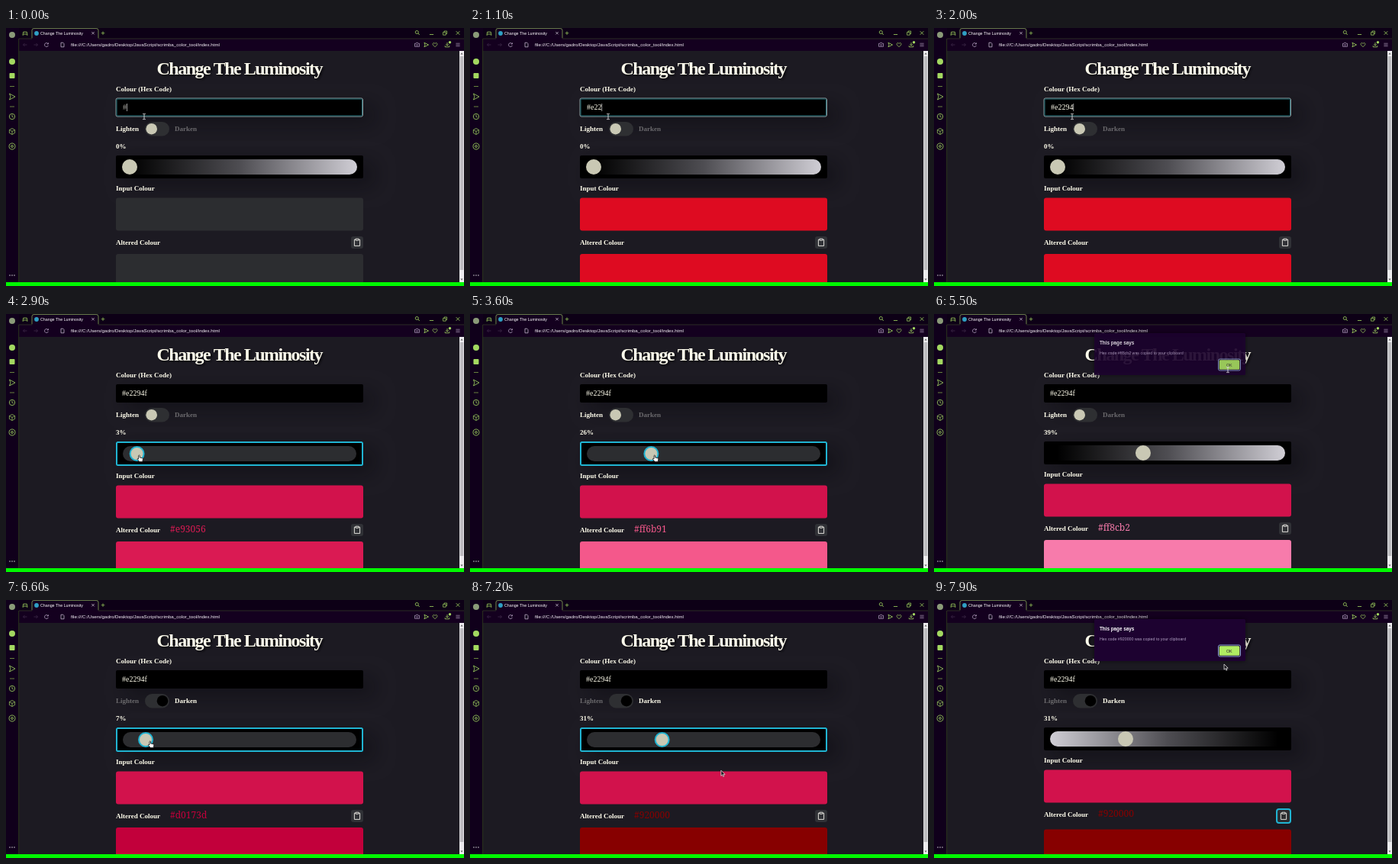
These frames come from a looping animation (600x338 px, 8 s). An HTML page with a canvas:

```html
<!DOCTYPE html>
<html lang="en">
<head>
<meta charset="utf-8">
<title>Change The Luminosity</title>
<style>
html, body { margin: 0; width: 100%; height: 100%; overflow: hidden; background: #1c1a22; }
canvas { display: block; width: 600px; height: 338px; }
</style>
</head>
<body>
<canvas id="stage"></canvas>
<script>
const LOOP = 8000, W = 600, H = 338;
const CREAM = '#fffdec', CYAN = '#20b4d2', LIME = '#a3d860', PALE = '#b9a9c6';
const GREY = '#2c2d30', KNOB = '#c9c8b4';
const SERIF = '"Liberation Serif", "Times New Roman", serif';
const SANS = '"Liberation Sans", Arial, sans-serif';
const canvas = document.getElementById('stage');
const c = canvas.getContext('2d');
const dpr = window.devicePixelRatio || 1;
canvas.width = W * dpr;
canvas.height = H * dpr;

// [time, typed text]
const typing = [[0, '#'], [500, '#e'], [800, '#e2'], [1050, '#e22'], [1400, '#e229'], [1700, '#e2294'], [2100, '#e2294f']];
const lightDrag = [[2800, 0], [3000, 5], [3600, 26], [3950, 39]];
const darkDrag = [[6350, 0], [6600, 7], [7000, 31]];
const toggleAt = 6000;
const alerts = [{ open: 4650, close: 5470, code: '#ff8cb2' }, { open: 7600, close: 9000, code: '#920000' }];
const pointer = [
  [2250, 181, 116], [2700, 166, 185], [2800, 166, 185], [3000, 181, 185], [3600, 241, 185], [3950, 278, 185],
  [4050, 278, 185], [4400, 462, 292], [4700, 462, 292], [5250, 385, 68], [5400, 385, 68], [5500, 385, 73],
  [5600, 370, 80], [5950, 199, 132], [6050, 199, 132], [6300, 168, 185], [6350, 168, 185],
  [6600, 188, 185], [7000, 255, 185], [7080, 255, 185], [7380, 462, 292], [7600, 462, 292], [7900, 380, 84]
];

const clamp = (x, a = 0, b = 1) => Math.min(b, Math.max(a, x));
const smooth = p => p * p * (3 - 2 * p);
const within = (t, a, b) => t >= a && t < b;

function along(keys, t, ease = p => p) {
  if (t <= keys[0][0]) return keys[0].slice(1);
  for (let i = 1; i < keys.length; i++) {
    const a = keys[i - 1], b = keys[i];
    if (t <= b[0]) {
      const p = ease((t - a[0]) / (b[0] - a[0]));
      return a.slice(1).map((v, k) => v + (b[k + 1] - v) * p);
    }
  }
  return keys[keys.length - 1].slice(1);
}

function box(x, y, w, h, r, fill, stroke, lw = 1) {
  c.beginPath();
  c.roundRect(x, y, w, h, r);
  if (fill) { c.fillStyle = fill; c.fill(); }
  if (stroke) { c.strokeStyle = stroke; c.lineWidth = lw; c.stroke(); }
}

function disc(x, y, r, fill, stroke, lw = 1) {
  box(x - r, y - r, 2 * r, 2 * r, r, fill, stroke, lw);
}

function path(d, x, y, stroke, lw = 0.9, fill) {
  c.save();
  c.translate(x, y);
  const p = new Path2D(d);
  if (fill) { c.fillStyle = fill; c.fill(p); }
  if (stroke) { c.strokeStyle = stroke; c.lineWidth = lw; c.stroke(p); }
  c.restore();
}

function text(s, x, y, font, fill) {
  c.font = font;
  c.fillStyle = fill;
  c.fillText(s, x, y);
}

const label = (s, y, x = 144, fill = CREAM) => text(s, x, y, `bold 9px ${SERIF}`, fill);

function shadow(draw) {
  c.save();
  c.shadowColor = 'rgba(8,6,12,.42)';
  c.shadowBlur = 24 * dpr;
  c.shadowOffsetX = 14 * dpr;
  c.shadowOffsetY = 10 * dpr;
  draw();
  c.restore();
}

const shift = (rgb, pct) => rgb.map(v => Math.floor(clamp(v + pct * 2.55, 0, 255)));
const hex = rgb => '#' + rgb.map(v => v.toString(16).padStart(2, '0')).join('');
// slight screen toning of the swatches
const tone = ([r, g, b]) =>
  `rgb(${r * 0.94 - 2 + Math.max(0, g - 41) * 0.09},${Math.max(0, g * 1.06 - 25)},${b * 0.96})`;

function state(t) {
  const typed = typing.filter(k => k[0] <= t).pop()[1];
  const dark = t >= toggleAt;
  const value = Math.round(along(dark ? darkDrag : lightDrag, t)[0]);
  const input = t >= 2100 ? [226, 41, 79] : t >= 1050 ? [238, 34, 34] : null;
  let focus = '';
  if (t < 2750) focus = 'input';
  else if (t < 4350 || within(t, 6330, 7400)) focus = 'slider';
  else if (t < 5450 || t >= 7400) focus = 'copy';
  return { typed, dark, value, input, focus, altered: input && shift(input, dark ? -value : value) };
}

function browser() {
  box(0, 0, W, 30, 0, '#0d0016');
  box(0, 0, 17, H, 0, '#10001b');
  box(17, 14, W, 16, 0, '#14001f');
  box(34, 0.5, 87, 14, [3, 3, 0, 0], '#14001f');
  path('M17 14H34V3Q34 .5 37 .5H118Q121 .5 121 3V14H600', 0, 0, '#3d4a2c', 0.6);
  path('M34 13V3Q34 .5 37 .5H118Q121 .5 121 3V13', 0, 0, '#7f9a58', 0.7);
  path('M16.7 14V333', 0, 0, '#34431f', 0.8);

  disc(8, 9, 4, '#8a9a78');
  disc(8, 44, 4, LIME);
  box(4.5, 59, 7, 7, 1, LIME);
  path('M-3 0H3', 8, 76.5, '#7fa347', 0.8);
  path('M-3.5 -4L4 0L-3.5 4L-2 0Z', 8, 90, LIME, 0.8);
  path('M-3 0H3', 8, 103, '#7fa347', 0.8);
  disc(8, 116, 3.7, null, LIME, 0.8);
  path('M0 -2.3V0L1.7 1', 8, 116, LIME, 0.8);
  path('M0 -4L3.6 -2V2L0 4L-3.6 2V-2ZM-3.6 -2L0 0L3.6 -2M0 0V4', 8, 135.5, LIME, 0.7);
  path('M-1 -4H1L3.5 -2.5L4 0L3.5 2.5L1 4H-1L-3.5 2.5L-4 0L-3.5 -2.5Z', 8, 155, LIME, 0.8);
  disc(8, 155, 1.4, null, LIME, 0.8);
  for (const x of [5, 8, 11]) disc(x, 324, 0.75, '#ddd');

  path('M-3 2.5L-2.3 -1.8H2.3L3 2.5L1.4 1H-1.4Z', 25, 7, LIME, 0.8);
  disc(40, 7, 2.9, '#2f9fc4');
  text('Change The Luminosity', 45, 9, `5.3px ${SANS}`, '#fff');
  path('M-1.7 -1.7L1.7 1.7M1.7 -1.7L-1.7 1.7', 114, 6.7, '#d8d0de', 0.7);
  path('M-2.3 0H2.3M0 -2.3V2.3', 127, 6.7, LIME, 0.7);

  path('M2.5 0H-2.5M-.5 -2L-2.5 0L-.5 2', 25, 22, '#3d2948', 0.8);
  path('M-2.5 0H2.5M.5 -2L2.5 0L.5 2', 39, 22, '#3d2948', 0.8);
  path('M2.2 -1.2A2.5 2.5 0 1 0 2.4 .9M2.4 -2.7V-1H.7', 53, 22, PALE, 0.8);
  path('M-2 -2.8H.8L2 -1.4V2.8H-2Z', 74, 22, '#d5cddd', 0.7);
  text('file:///C:/Users/gadro/Desktop/JavaScript/scrimba_color_tool/index.html', 85, 24.2, `6.2px ${SANS}`, '#f8f5fa');

  disc(538.3, 5.5, 2, null, LIME, 0.8);
  path('M1.5 1.5L3.4 3.4', 538.3, 5.5, LIME, 0.9);
  path('M-2.6 0H2.6', 557.5, 8.5, LIME, 0.8);
  path('M-2.5 -1H1.2V2.6H-2.5ZM-1 -1V-2.6H2.6V1H1.2', 575, 6.6, LIME, 0.7);
  path('M-2.3 -2.3L2.3 2.3M2.3 -2.3L-2.3 2.3', 592, 6.5, LIME, 0.8);
  path('M-3 -1.7H-1.5L-.8 -2.7H.8L1.5 -1.7H3V2.3H-3Z', 538.5, 22, PALE, 0.7);
  disc(538.5, 22.3, 1, null, PALE, 0.6);
  path('M-2.6 -2.8L3 0L-2.6 2.8L-1.5 0Z', 550.5, 22, LIME, 0.8);
  path('M0 2.8L-2.8 -.1C-3.5 -2.6 -.7 -3.3 0 -1.4C.7 -3.3 3.5 -2.6 2.8 -.1Z', 562, 22, LIME, 0.7);
  path('M0 -3V1M-1.8 -.7L0 1.2L1.8 -.7M-2.8 1.2V2.8H2.8V1.2', 578, 22, LIME, 0.8);
  disc(581.5, 18.7, 1.7, LIME);
  path('M-2.6 -1.8H2.6M-2.6 0H2.6M-2.6 1.8H2.6', 592, 22, PALE, 0.6);

  box(594, 30, 6, 303, 0, '#ececee');
  box(594.7, 37, 4.6, 280, 0, '#bdbdc0');
  path('M-1.6 .9L0 -.9L1.6 .9Z', 597, 33.5, null, 1, '#555');
  path('M-1.6 -.9L0 .9L1.6 -.9Z', 597, 329.5, null, 1, '#555');
}

function heading() {
  c.save();
  c.letterSpacing = '-1.5px';
  c.shadowColor = '#08070b';
  c.shadowBlur = 3 * dpr;
  c.shadowOffsetX = c.shadowOffsetY = 2 * dpr;
  text('Change The Luminosity', 197.5, 61, `bold 24px ${SERIF}`, CREAM);
  c.restore();
}

function hexField(s, t) {
  const on = s.focus === 'input';
  shadow(() => box(144, 92, 324, 24, 2, '#000'));
  if (on) {
    box(144, 92, 323.5, 24, 2, null, '#b4bfc1', 0.8);
    box(145, 93, 321.5, 22, 1, null, '#23727d', 1);
  }
  const x = on ? 153 : 152;
  text(s.typed, x, 107.3, `10px ${SERIF}`, s.typed === '#' ? '#b0afa8' : CREAM);
  const last = typing.filter(k => k[0] <= t).pop()[0];
  if (on && (t - last) % 1000 < 500) {
    box(x + c.measureText(s.typed).width, 99, 0.7, 10, 0, '#d8d8d8');
  }
}

function toggle(s, t) {
  const p = smooth(clamp((t - toggleAt) / 180));
  label('Lighten', 135, 144, s.dark ? '#6b6a6d' : CREAM);
  label('Darken', 135, 221, s.dark ? CREAM : '#6b6a6d');
  box(182, 123, 32, 18.5, 9.25, '#2e2f32');
  disc(190.7 + 14.3 * p, 132.2, 7.3, p > 0.5 ? '#000' : KNOB);
}

function slider(s) {
  const on = s.focus === 'slider', d = on ? 1 : 0;
  label(s.value + '%', 157.5);
  shadow(() => box(144, 167, 324, 30 + 2 * d, 2, '#000'));
  if (on) box(145, 168, 322, 30, 1.5, null, CYAN, 2);
  let fill = GREY;
  if (!on) {
    fill = s.dark ? c.createLinearGradient(460, 0, 152, 0) : c.createLinearGradient(152, 0, 460, 0);
    fill.addColorStop(0.03, '#000');
    fill.addColorStop(0.5, '#4e4d52');
    fill.addColorStop(1, '#d0ced5');
  }
  box(152 + d, 172 + d, 308 - 2 * d, 20, 10, fill);
  const x = 162 + d + s.value / 100 * (287 - d);
  disc(x, 182 + d, on ? 9 : 10, KNOB, on ? CYAN : null, 2);
}

function swatches(s) {
  const d = s.focus === 'slider' ? 2 : 0, copy = s.focus === 'copy';
  label('Input Colour', 213 + d);
  box(144, 222.5 + d, 324, 43, 3, s.input ? tone(s.input) : GREY);
  label('Altered Colour', 283.5 + d);
  if (s.input && s.value > 0) {
    text(hex(s.altered), 215, 284 + d, '12px "Noto Serif", serif', tone(s.altered));
  }
  box(144, copy ? 300.5 : 296 + d, 324, 50, 3, s.altered ? tone(s.altered) : GREY);
  if (copy) box(449, 274, 18, 18, 3, GREY, CYAN, 2);
  else box(452, 273 + d, 16, 16, 3, '#303136');
  path('M-2 -3.8H-3.6V4.4H3.6V-3.8H2M-2 -4.8H2V-2.8H-2Z', copy ? 458 : 460, copy ? 283 : 281 + d, '#f4f2ec', 0.9);
}

function dialog(t) {
  for (const a of alerts) {
    const alpha = Math.min(clamp((t - a.open) / 120), 1 - clamp((t - a.close) / 200));
    if (t < a.open || alpha <= 0) continue;
    c.save();
    c.globalAlpha = alpha;
    c.shadowColor = 'rgba(0,0,0,.6)';
    c.shadowBlur = 6 * dpr;
    box(210, 25, 198, 55, 1.5, '#1d0230');
    c.shadowColor = 'transparent';
    text('This page says', 217, 40, `bold 6.3px ${SANS}`, '#fff');
    text(`Hex code ${a.code} was copied to your clipboard`, 217, 52.5, `5.3px ${SANS}`, '#b3a2c4');
    box(372.5, 59, 29, 15, 2, null, '#8aa7d0', 1);
    box(373.7, 60.2, 26.6, 12.6, 1.5, '#b0ec62');
    text('OK', 383, 68.6, `5.3px ${SANS}`, '#24102f');
    c.restore();
  }
}

const ARROW = 'M0 0V7.2L1.7 5.7L2.8 8.2L4 7.7L2.9 5.2H5.2Z';
const HAND = 'M0 .5Q.8 -.6 1.6 .5V3L5 3.8Q6 4.1 5.8 5.2L5.2 8.6H1.2L-1.6 5.2Q-1.6 4.2 -.7 4.4L0 5Z';

function cursor(t) {
  const [x, y] = along(pointer, t, smooth);
  if (t < 2350 || within(t, 5460, 5560)) {
    path('M-1.8 -3.6H-.5L0 -3.2L.5 -3.6H1.8M0 -3.2V3.2M-1.8 3.6H-.5L0 3.2L.5 3.6H1.8', x, y, '#dedee0', 0.9);
    return;
  }
  const hand = within(t, 2620, 4120) || within(t, 4340, 4680) || within(t, 5900, 7120) || within(t, 7340, 7620);
  path(hand ? HAND : ARROW, x, y, hand ? '#111' : '#ddd', 0.8, hand ? '#fff' : '#17131b');
}

function draw(t) {
  const s = state(t);
  c.setTransform(dpr, 0, 0, dpr, 0, 0);
  box(0, 0, W, H, 0, '#1c1a22');
  heading();
  label('Colour (Hex Code)', 82.5);
  hexField(s, t);
  toggle(s, t);
  slider(s);
  swatches(s);
  browser();
  dialog(t);
  cursor(t);
  box(0, 333, W, 5, 0, '#00f900');
}

const start = performance.now();
function tick() {
  draw((performance.now() - start) % LOOP);
  requestAnimationFrame(tick);
}
tick();
</script>
</body>
</html>
```
